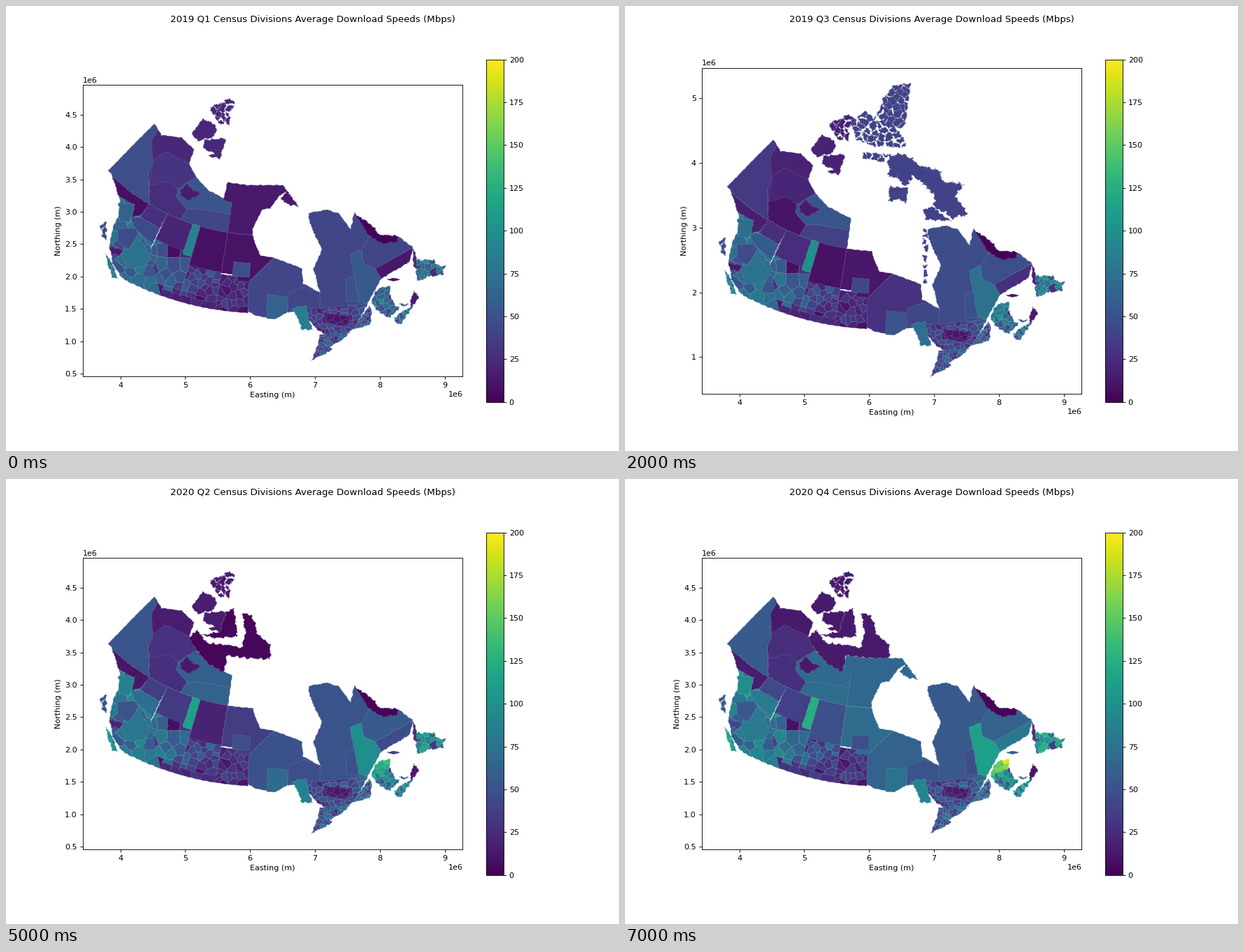
A matplotlib script for the animation above (8000 ms loop, 877x638 px).

```python
import numpy as np
import matplotlib.pyplot as plt
from matplotlib.animation import FuncAnimation
from matplotlib.cm import ScalarMappable
from matplotlib.collections import PolyCollection
from matplotlib.colors import Normalize
from matplotlib.path import Path

SCALE = 92.8  # map units per million metres
Q = np.arange(8)
QUARTERS = [f"{y} Q{q}" for y in (2019, 2020) for q in (1, 2, 3, 4)]
SHORT, TALL = (0.456e6, 4.956e6), (0.435e6, 5.471e6)
DIP = np.where(Q < 4, np.sin(np.pi * Q / 4), 0)  # slump through 2019

# Quarters in which the northern divisions have readings
HIGH = (Q >= 2) & (Q <= 4)
WEST = Q >= 5
INLAND = (Q != 2) & (Q != 5)

polys, speeds = [], []


def pts(*flat):
    return np.array(flat, float).reshape(-1, 2)


def join(*parts):
    return np.vstack(parts)


def project(lon, lat):
    """Lambert conformal conic on a sphere, in map units."""
    def tan(d):
        return np.tan(np.radians(45 + d / 2))

    def cos(d):
        return np.cos(np.radians(d))
    n = np.log(cos(49) / cos(77)) / np.log(tan(77) / tan(49))
    f = 6.371 * cos(49) * tan(49) ** n / n
    rho, rho0 = f / tan(lat) ** n, f / tan(63.39) ** n
    theta = n * np.radians(lon + 91.867)
    east, north = 6.2 + rho * np.sin(theta), 3 + rho0 - rho * np.cos(theta)
    return np.column_stack([163.6 + (east - 4) * SCALE, 480.6 - (north - 1) * SCALE])


def arc(lat, lon0, lon1):
    return project(np.linspace(lon0, lon1, 12), lat)


def block(west, east, south, north):
    return join(arc(north, west, east), arc(south, east, west))


def wobble(p, amp):
    """Roughen an outline with a fixed displacement field, so neighbours agree."""
    out = []
    for a, b in zip(p, np.roll(p, -1, axis=0)):
        n = max(1, int(np.hypot(*(b - a)) / 0.9))
        out.append(a + (b - a) * np.arange(n)[:, None] / n)
    q = np.vstack(out)
    x, y = q.T
    dx = np.sin(1.31 * x + 0.73 * y) + 1.6 * np.sin(0.47 * y - 0.61 * x + 1) + np.sin(2.3 * y)
    dy = np.sin(1.17 * y - 0.83 * x) + 1.6 * np.sin(0.53 * x + 0.41 * y + 2) + np.sin(2.1 * x)
    return q + amp / 2 * np.column_stack([dx, dy])


def add(shape, values, amp):
    x, y = wobble(shape, amp).T
    polys.append(np.column_stack([4e6 + (x - 163.6) / SCALE * 1e6,
                                  1e6 + (480.6 - y) / SCALE * 1e6]))
    speeds.append(values)


def pace(start, end, dip=0, power=2, seen=True):
    """Speed in each quarter, eased from start to end."""
    v = start + (end - start) * (Q / 7) ** power - dip * DIP
    return np.where(seen, v, np.nan)


def region(shape, values, amp=0.5):
    add(shape, values, amp)


def half_plane(p, mid, d):
    """Part of polygon p on the near side of the line through mid with normal d."""
    out = []
    s = (p - mid) @ d
    for i in range(len(p)):
        j = (i + 1) % len(p)
        if s[i] <= 0:
            out.append(p[i])
        if s[i] * s[j] < 0:
            out.append(p[i] + (p[j] - p[i]) * s[i] / (s[i] - s[j]))
    return np.array(out)


def cells(shape, n, rng):
    """Split a shape into n nearest-seed cells with well spread seeds."""
    inside, lo, hi = Path(shape), shape.min(0), shape.max(0)
    seeds = []
    while len(seeds) < n:
        c = rng.uniform(lo, hi, (60, 2))
        c = c[inside.contains_points(c)][:5]
        if len(c):
            gap = [min((np.hypot(*(p - s)) for s in seeds), default=0) for p in c]
            seeds.append(c[int(np.argmax(gap))])
    for s in seeds:
        cell = shape
        for o in seeds:
            if o is not s and len(cell):
                cell = half_plane(cell, (s + o) / 2, o - s)
        if len(cell) > 2:
            yield s, cell


def divisions(shape, n, mean, spread, growth, amp=0.5):
    rng = np.random.default_rng(n)
    for _, cell in cells(shape, n, rng):
        base = np.clip(rng.normal(mean, spread), 7, mean + 2 * spread)
        add(cell, base * growth ** (Q / 7) * rng.uniform(0.93, 1.07, 8), amp)


def archipelago(shape, n, values, size=0.86, amp=1.1):
    """Islands made by shrinking the cells of a shape."""
    rng = np.random.default_rng(n)
    for s, cell in cells(shape, n, rng):
        add(s + (cell - s) * size * rng.uniform(0.85, 1.05), values, amp)


# Northwest Territories and Yukon
delta = pace(23, 14, power=0.6)
region(join(pts(212, 169, 222, 185, 252, 189, 269, 206, 262, 226, 272, 246, 290, 265,
                323, 282), arc(60, -102, -126), pts(204, 240, 208, 193)), delta)
region(join(pts(212, 169, 216, 180, 208, 193, 210, 225, 204, 240), arc(60, -126, -139),
            pts(151, 241, 146, 236)), pace(47, 57, 14), 0.3)
region(pts(281, 162, 299, 170, 301, 179, 296, 188, 275, 193, 266, 184), delta, 0.9)
region(pts(284, 192, 315, 190, 306, 219, 290, 215, 298, 211, 282, 204), delta, 0.9)
archipelago(pts(292, 145, 322, 132, 331, 140, 320, 150, 320, 172, 302, 168), 11, delta)
region(pts(210, 223, 228, 209, 262, 226, 272, 246, 246, 262, 205, 258), pace(30, 27, 8))
region(join(pts(205, 258, 232, 251, 246, 262, 244, 274, 259, 291), arc(60, -116, -126)),
       pace(26, 28, 16))
region(pts(272, 246, 290, 265, 323, 282, 321, 299, 275, 291, 259, 291, 244, 274, 246, 262),
       pace(52, 68), 0.3)
region(pts(250, 265, 258, 255, 267, 264, 279, 268, 263, 279, 250, 272), pace(15, 13), 0.8)
region(join(pts(259, 291, 275, 291, 321, 299), arc(60, -102, -116)), pace(42, 70, 12, 1), 0.3)

# Nunavut
west = pace(0, 14, power=4, seen=WEST)
region(pts(262, 226, 274, 216, 288, 235, 324, 239, 337, 243, 343, 220, 338, 193, 352, 196,
           360, 222, 378, 238, 378, 258, 345, 257, 317, 253, 311, 278, 290, 265, 272, 246),
       west, 1.1)
region(pts(315, 191, 326, 186, 331, 226, 300, 228, 281, 224, 306, 219), west, 1)
inland = pace(14, 66, power=4, seen=INLAND)
region(join(pts(323, 282, 311, 278, 317, 253, 345, 257, 396, 257, 402, 265, 391, 272,
                378, 290, 366, 292, 353, 320), arc(60, -95, -102)), inland, 0.4)
region(pts(393, 276, 402, 265, 418, 287, 403, 285), inland, 0.9)
high = pace(42, 24, power=1.5, seen=HIGH)
archipelago(pts(369, 110, 384, 92, 409, 87, 402, 139, 398, 152, 372, 150), 24, high, 0.98)
archipelago(pts(322, 140, 345, 128, 356, 140, 368, 116, 385, 150, 401, 168, 401, 180,
                362, 180, 330, 168), 30, high)
archipelago(pts(340, 187, 378, 190, 370, 201, 341, 197), 5, high)
region(pts(376, 192, 398, 190, 426, 208, 451, 213, 455, 229, 485, 232, 472, 250, 489, 276,
           470, 281, 443, 266, 443, 246, 411, 220, 402, 236, 391, 222, 378, 222), high, 1.8)
region(pts(378, 236, 405, 238, 402, 259, 394, 254, 378, 257), high, 1.1)
region(pts(428, 268, 442, 266, 465, 285, 430, 283), high, 1.4)
archipelago(pts(425, 297, 434, 297, 432, 375, 427, 375), 8, high, 0.7)

# Alberta, Saskatchewan, Manitoba
divisions(block(-120, -110, 49, 60), 30, 46, 18, 1.35, 0.4)
region(block(-120, -112.3, 56, 60), pace(20, 38, power=1), 0.4)
region(block(-112.3, -110, 55.5, 60), pace(88, 125, power=1), 0.3)
divisions(block(-110, -102, 49, 54.4), 28, 30, 13, 1.3, 0.3)
divisions(block(-114, -102, 49, 49.9), 5, 15, 4, 1.5, 0.2)
region(block(-110, -102, 54.3, 60), pace(9, 49, power=4), 0.3)
divisions(block(-102, -95.1, 49, 54), 24, 20, 9, 1.2, 0.2)
region(join(arc(60, -102, -94.8), pts(357, 343, 364, 358, 383, 361), arc(53.4, -95.1, -98),
            arc(54.2, -98, -102)), pace(10, 70, power=2.5), 0.3)
region(block(-99.3, -95.1, 54, 56), pace(48, 48, 5), 0.3)

# British Columbia
divisions(join(arc(60, -139, -120), pts(207, 345, 214, 390), arc(49, -114, -123),
               pts(153, 370, 148, 342, 153, 318, 163, 298, 162, 259)), 36, 62, 15, 1.22, 0.7)
region(join(arc(60, -139, -126), pts(192, 300, 180, 303, 184, 286, 161, 272)), pace(8, 15, -8))
region(join(arc(60, -126, -120), pts(220, 319, 192, 303)), pace(28, 43, 3))
region(pts(192, 303, 220, 319, 209, 341, 184, 318, 179, 304), pace(45, 82, power=1))
region(pts(161, 282, 185, 284, 177, 310, 162, 308), pace(62, 97, power=1), 0.9)
region(pts(160, 320, 184, 318, 190, 328, 175, 349, 160, 338), pace(46, 55))
region(pts(165, 349, 176, 349, 190, 326, 207, 362, 196, 374, 172, 376), pace(75, 82), 0.9)
region(pts(148, 346, 166, 349, 164, 357, 152, 356), pace(14, 40, power=4), 0.9)
archipelago(pts(135, 313, 144, 310, 143, 336, 137, 330), 3, pace(45, 55), 0.9)
divisions(pts(142, 356, 148, 362, 160, 390, 152, 390), 6, 78, 12, 1.35, 0.9)

# Ontario
region(pts(347, 396, 383, 361, 423, 376, 425, 398, 449, 411, 450, 435, 403, 439, 384, 449,
           358, 444, 346, 438), pace(42, 62, 14, 3), 0.4)
region(pts(404, 411, 427, 402, 449, 411, 450, 435, 418, 431, 403, 439), pace(42, 52), 0.4)
region(pts(374, 414, 402, 417, 403, 439, 384, 449, 373, 448), pace(62, 75, 10), 0.4)
divisions(pts(420, 432, 450, 434, 487, 426, 518, 426, 510, 441, 496, 463, 470, 480, 447, 465,
              430, 446), 46, 31, 11, 1.3, 0.7)
divisions(pts(455, 440, 492, 445, 486, 460, 458, 454), 8, 14, 4, 1.3)
region(pts(410, 433, 430, 430, 432, 444, 438, 464, 424, 464), pace(84, 90, 12), 0.9)
divisions(pts(449, 471, 492, 467, 478, 481, 463, 488, 467, 493, 437, 508, 446, 488),
          32, 48, 16, 1.2, 0.8)

# Quebec and Labrador
region(pts(433, 297, 460, 292, 476, 298, 493, 321, 498, 297, 534, 328, 562, 331, 582, 346,
           577, 367, 536, 391, 517, 426, 449, 434, 449, 411, 440, 376, 452, 350, 434, 310),
       pace(42, 55, power=1), 0.6)
region(pts(509, 350, 520, 331, 562, 334, 582, 346, 528, 377, 511, 370), pace(42, 63, power=1))
region(pts(498, 297, 527, 317, 534, 328, 562, 330, 560, 338, 540, 341, 519, 330), pace(2, 3), 1)
region(pts(528, 377, 582, 347, 577, 367, 536, 391), pace(12, 80, -10), 0.4)
region(pts(492, 356, 508, 350, 511, 369, 528, 377, 536, 391, 517, 426, 505, 424),
       pace(55, 112, power=0.9), 0.4)
region(pts(486, 391, 498, 386, 505, 424, 487, 424), pace(50, 47))
region(pts(545, 392, 554, 390, 564, 392, 554, 395), pace(8, 62), 0.3)
divisions(pts(495, 464, 511, 442, 520, 429, 523, 437, 521, 457), 26, 52, 17, 1.3, 0.6)
divisions(pts(522, 425, 529, 410, 538, 403, 550, 402, 548, 416, 530, 424), 5, 55, 7, 2.6, 0.8)

# Atlantic provinces
divisions(pts(523, 425, 550, 415, 556, 430, 563, 432, 549, 448, 529, 435), 14, 60, 15, 1.45, 0.9)
divisions(pts(556, 447, 583, 428, 570, 449, 565, 457, 558, 454), 12, 60, 15, 1.45, 1)
region(pts(562, 427, 576, 428, 570, 431), pace(50, 70), 0.8)
region(pts(583, 408, 590, 418, 580, 431, 579, 424), pace(15, 12), 1)
divisions(pts(586, 364, 612, 364, 616, 372, 628, 373, 625, 385, 604, 388, 588, 395),
          15, 68, 17, 1.5, 1.1)
region(pts(582, 347, 586, 354, 588, 377, 583, 374), pace(24, 30, 8), 0.7)

speeds = np.array(speeds)

fig, ax = plt.subplots(figsize=(877 / 80, 638 / 80), dpi=80)
scale = ScalarMappable(Normalize(0, 200), "viridis")
fig.colorbar(scale, ax=ax)
title = fig.suptitle("")
ax.set_aspect("equal")
ax.set_xlim(3.418e6, 9.277e6)
ax.set_xlabel("Easting (m)")
ax.set_ylabel("Northing (m)")
land = PolyCollection(polys, linewidths=0.4)
ax.add_collection(land, autolim=False)


def update(i):
    now = speeds[:, i]
    known = ~np.isnan(now)
    face = scale.to_rgba(np.nan_to_num(now))
    face[:, 3] = known
    edge = 0.75 * face + 0.25  # pale seams
    edge[:, 3] = 0.8 * known
    land.set_facecolor(face)
    land.set_edgecolor(edge)
    ax.set_ylim(TALL if HIGH[i] else SHORT)
    title.set_text(f"{QUARTERS[i]} Census Divisions Average Download Speeds (Mbps)")
    return land, title


anim = FuncAnimation(fig, update, frames=len(QUARTERS), interval=1000,
                     repeat=True, repeat_delay=0, blit=False)
plt.show()
```
